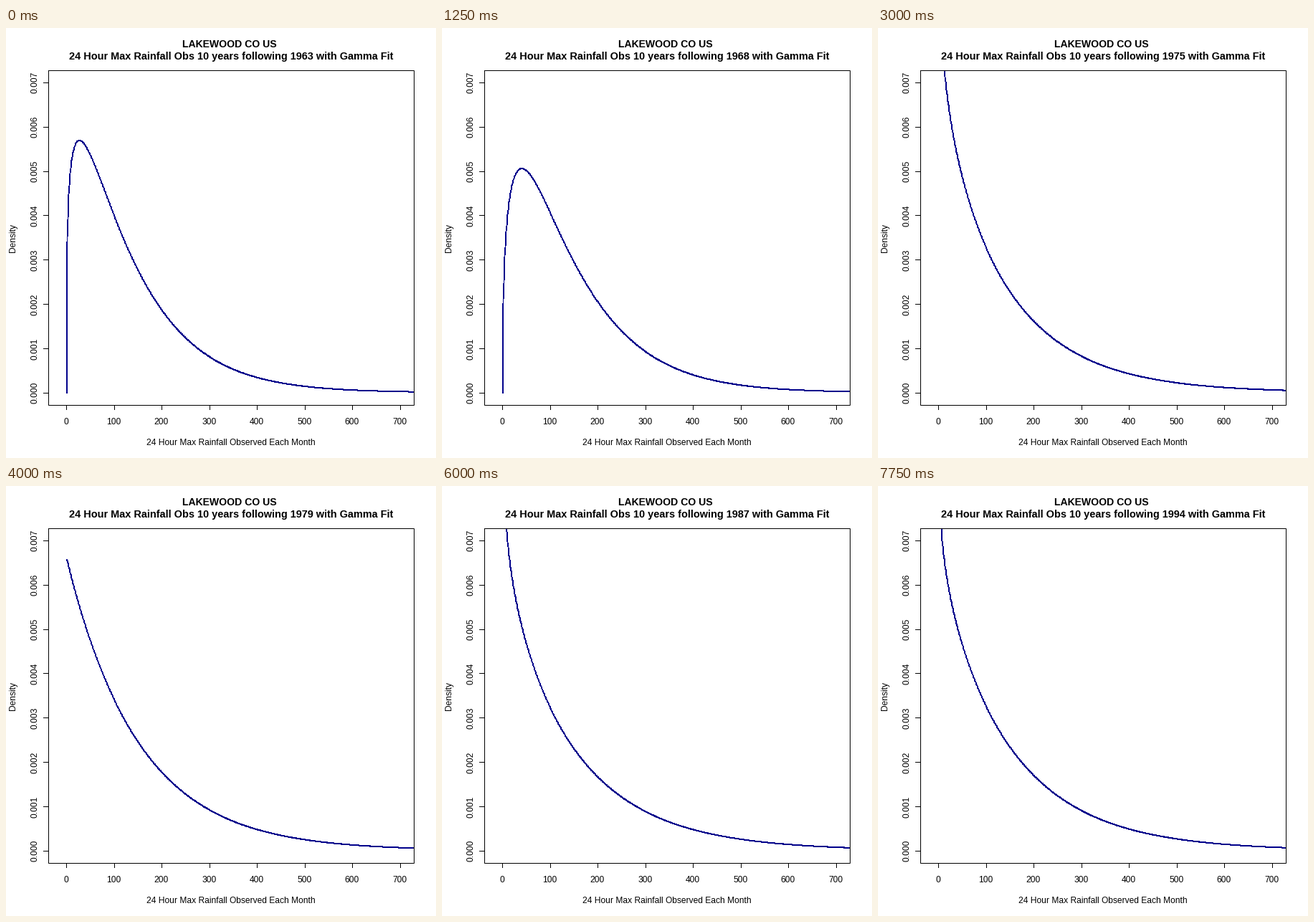
A matplotlib script that plays this animation: 600x600 px, repeating every 8 s.

```python
import math

import matplotlib.pyplot as plt
import numpy as np
from matplotlib.animation import FuncAnimation
from matplotlib.patches import Rectangle

SIZE, DPI = 600, 100
PX = 72 / DPI                   # one pixel in points
FRAMES, INTERVAL = 32, 250
FIRST_YEAR = 1963
X0, Y0 = 84.5, 509.24           # pixel position of the data origin
X_UNIT, Y_UNIT = 0.665, 61841   # pixels per data unit
LEFT, TOP, RIGHT, BOTTOM = 59, 59, 569, 526

# Gamma fit: years since the first, shape, scale
FITS = np.array([
    (0, 1.25, 106.8), (5, 1.38, 105.4), (10, 1.02, 140), (12, 0.88, 160),
    (15, 1.02, 148), (16, 0.998, 152.6), (19, 0.873, 189),
    (24, 0.893, 169.5), (30, 1.02, 152), (31, 0.917, 168),
])

plt.rcParams["font.family"] = "Liberation Sans"
fig = plt.figure(figsize=(SIZE / DPI, SIZE / DPI), dpi=DPI, facecolor="white")
ax = fig.add_axes([0, 0, 1, 1])
ax.set_xlim(0, SIZE)
ax.set_ylim(SIZE, 0)
ax.axis("off")


def label(x, y, text, px=12, **style):
    return ax.text(x, y, text, fontsize=px * PX, ha="center",
                   va="baseline", rotation_mode="anchor", **style)


def rule(xs, ys):
    """Draw a crisp line through the centres of whole pixels."""
    ax.plot(np.floor(xs) + 0.5, np.floor(ys) + 0.5, color="black", lw=PX,
            snap=False, solid_capstyle="projecting",
            solid_joinstyle="miter", zorder=3)


def gamma_density(x, shape, scale):
    log_norm = math.lgamma(shape) + shape * math.log(scale)
    return np.exp((shape - 1) * np.log(x) - x / scale - log_norm)


# Frame, ticks and axis labels
rule([LEFT, RIGHT, RIGHT, LEFT, LEFT], [TOP, TOP, BOTTOM, BOTTOM, TOP])
for i in range(8):
    x = X0 + 100 * i * X_UNIT
    y = Y0 - 0.001 * i * Y_UNIT
    rule([x, x], [BOTTOM, BOTTOM + 6])
    rule([LEFT - 7, LEFT], [y, y])
    label(x - 0.7, 553, str(100 * i))
    label(43, y, f"{i / 1000:.3f}", rotation=90)
label(314, 582, "24 Hour Max Rainfall Observed Each Month")
label(13, 293, "Density", rotation=90)
label(311.5, 27, "LAKEWOOD CO US", 14, weight="bold")
title = label(313.7, 44, "", 14.5, weight="bold")

# Without antialiasing every touched pixel is filled, so this looks 2 px wide
curve, = ax.plot([], [], color="#00008b", lw=0.8 * PX, antialiased=False,
                 snap=False)
curve.set_clip_path(Rectangle((LEFT, TOP), RIGHT - LEFT, BOTTOM - TOP,
                              transform=ax.transData))
rain = np.arange(1, 760)


def draw(i):
    shape, scale = (np.interp(i, FITS[:, 0], FITS[:, c]) for c in (1, 2))
    # The density at zero is infinite for shapes below one
    start = 0 if shape > 1 else np.nan
    density = np.concatenate([[start], gamma_density(rain, shape, scale)])
    # Values are plotted against a one-based index, on whole pixels
    index = np.arange(1, len(density) + 1)
    curve.set_data(np.floor(X0 + index * X_UNIT),
                   np.floor(Y0 - density * Y_UNIT))
    title.set_text(f"24 Hour Max Rainfall Obs 10 years following "
                   f"{FIRST_YEAR + i} with Gamma Fit")
    return curve, title


anim = FuncAnimation(fig, draw, frames=FRAMES, interval=INTERVAL,
                     repeat=True, repeat_delay=0)
plt.show()
```
